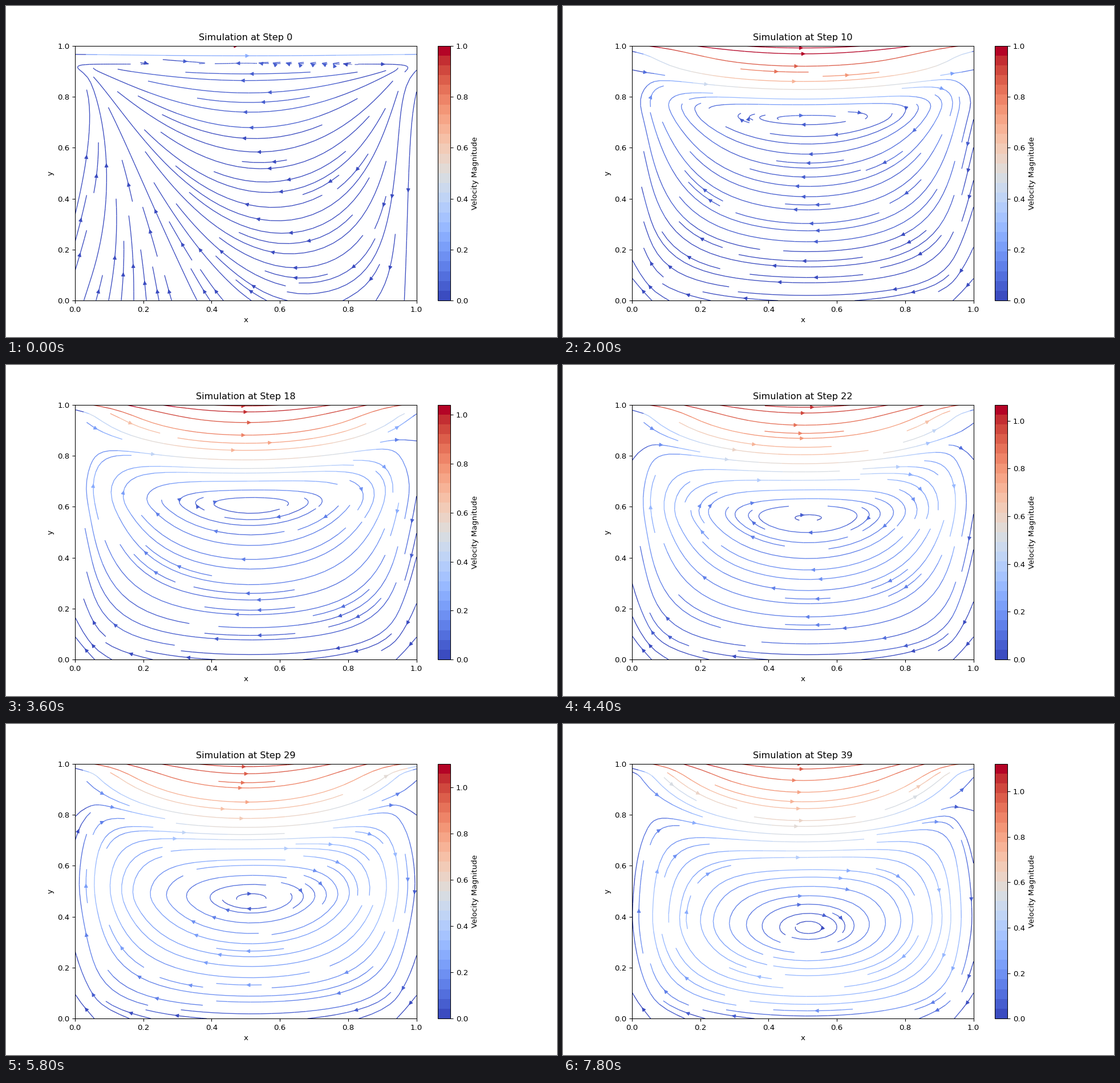
A matplotlib script for the animation above (8 s loop, 966 by 580 pixels).

```python
import numpy as np
import matplotlib.pyplot as plt
from matplotlib.animation import FuncAnimation
from matplotlib.cm import ScalarMappable
from matplotlib.colors import Normalize

DPI = 96.6
FRAMES, INTERVAL = 40, 200
NODES = 21
BANDS = 26
GHOST = 0.09    # the return flow reaches slightly past the bottom wall

axis = np.linspace(0, 1, NODES)
X, Y = np.meshgrid(axis, axis)


def first_push():
    """Pressure-driven flow right after the lid starts moving."""
    low = 0.18 * (1 - Y)
    turn = 0.5 + 0.2 * (1 - Y) ** 2
    high = 0.955 + 0.03 * Y ** 4
    half = np.where(X < turn, turn - low, high - turn)
    theta = np.pi / 2 * (X - turn) / half
    amp = 0.03 * np.exp(3 * (Y - 1))
    u = -amp * np.cos(theta) * np.pi / 2 / half
    v = -amp * np.sin(theta) * 5 * (1 - (Y / 0.93) ** 2)
    u[-2] = 0.04 * np.sqrt(np.abs(np.sin(np.pi * axis)))
    return u, v


def vortex(depth, vmax):
    """Recirculating flow whose centre lies this deep below the lid."""
    centre = 1 - depth
    back = 0.85 * depth ** 2
    power = 0.1 + 2.3 * depth ** 2
    linear = np.clip(2.8 * (depth - 0.3), 0, 1)

    # Speed along the vertical midline, and its integral
    t = np.linspace(-GHOST, 1.05, 1141)
    q = np.clip((t - centre) / depth, 0, 1)
    r = np.clip((centre - t) / (centre + GHOST), 0, 1)
    peak = (power / (1 + power)) ** power / (1 + power)
    drag = (1 - linear) * np.sin(np.pi / 2 * q) + linear * q ** 1.1
    profile = np.where(t > centre, drag, -back * r ** power * (1 - r) / peak)
    middle = np.cumsum(profile) * (t[1] - t[0])
    middle -= middle.min()
    flux = middle[0]
    upper = t > centre
    split = np.interp(flux, middle[upper], t[upper])

    def psi(x, y):
        eta = y - 0.36 * depth * y ** 2 * (1 - 2 * x) ** 2
        below = np.clip((centre - eta) / centre, 0, 1)
        width = 0.1 + 1.45 * depth + 1.5 * below
        bump = np.sin(np.pi * np.clip(x, 0, 1) ** 1.05)
        s = np.tanh(bump / width) / np.tanh(1 / width)
        wall = flux + 4.3 * np.clip(eta - split - 0.03, 0, None) ** 2
        return wall + (np.interp(eta, t, middle) - wall) * s

    e = 0.02
    u = (psi(X, Y + e) - psi(X, Y - e)) / (2 * e)
    v = (psi(X - e, Y) - psi(X + e, Y)) / (2 * e)
    corner = np.exp(-((X - 0.9) / 0.1) ** 2 - ((1 - Y) / 0.08) ** 2)
    return u * (1 + 2 * (vmax - 1) * corner), v


def velocity(step, vmax):
    depth = 0.65 * ((step + 1) / FRAMES) ** 0.68
    u, v = vortex(depth, vmax)
    mix = max(0, 1 - step / 3)
    u0, v0 = first_push()
    u, v = u + mix * (u0 - u), v + mix * (v0 - v)
    for f in (u, v):
        f[0] = f[:, 0] = f[:, -1] = 0
    u[-1, 1:-1] = 1
    v[-1] = 0.6 * v[-2]
    return u, v


fig, ax = plt.subplots(figsize=(966 / DPI, 580 / DPI), dpi=DPI)
cmap = plt.get_cmap("coolwarm", BANDS)
norm = Normalize(0, 1)
scale = ScalarMappable(norm, cmap)
fig.colorbar(scale, ax=ax, label="Velocity Magnitude")


def update(step):
    rise = np.clip((step - 12) / 27, 0, 1)
    vmax = 1 + 0.122 * np.sin(np.pi / 2 * rise)
    u, v = velocity(step, vmax)
    scale.set_clim(0, vmax)
    ax.cla()
    ax.streamplot(X, Y, u, v, color=np.hypot(u, v), cmap=cmap, norm=norm,
                  linewidth=1)
    ax.set(xlim=(0, 1), ylim=(0, 1), xlabel="x", ylabel="y")
    ax.set_title(f"Simulation at Step {step}", pad=7)
    return []


anim = FuncAnimation(fig, update, frames=FRAMES, interval=INTERVAL,
                     repeat=True, repeat_delay=0)
plt.show()
```
